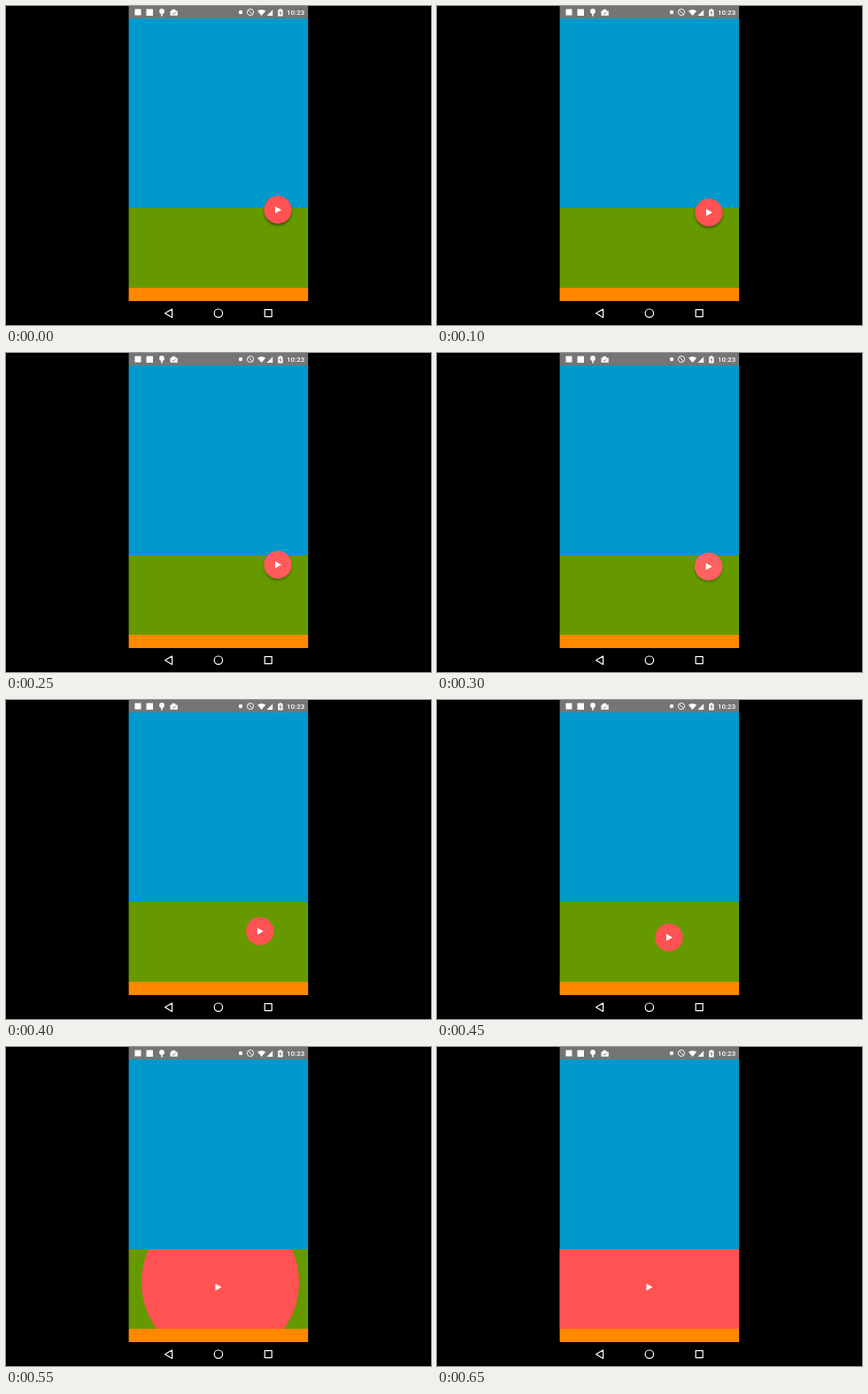
Animation of 480 by 360 pixels, one loop 700 ms. Source, as an HTML page:

```html
<!DOCTYPE html>
<html lang="en">
<head>
<meta charset="utf-8">
<title>Button reveal</title>
<style>
  html, body { margin: 0; width: 100%; height: 100%; overflow: hidden; background: #000; }
  svg { display: block; width: 480px; height: 360px; }
  text { font: 500 8px Roboto, sans-serif; }
</style>
</head>
<body>
<svg viewBox="0 0 480 360">
  <defs>
    <clipPath id="panel"><rect x="138.6" y="228" width="202.6" height="90"/></clipPath>
    <filter id="soft" x="-30%" y="-30%" width="160%" height="160%"><feGaussianBlur stdDeviation="1.7"/></filter>
  </defs>

  <rect width="480" height="360"/>
  <rect x="138.6" width="202.6" height="14" fill="#757575"/>
  <rect x="138.6" y="14" width="202.6" height="214" fill="#0099cc"/>
  <rect x="138.6" y="228" width="202.6" height="90" fill="#669900"/>
  <rect x="138.6" y="318" width="202.6" height="15" fill="#ff8800"/>

  <!-- status bar -->
  <g fill="#fff">
    <rect x="145.5" y="3.5" width="7" height="7"/>
    <rect x="158.5" y="3.5" width="7.5" height="7.5"/>
    <circle cx="176" cy="6" r="2.9"/>
    <path d="M175.2 8h1.6v3.4h-1.6z"/>
    <path d="M185.5 5.5h1.3l1-1.7h3l1 1.7h2v5.3h-8.3z"/>
    <circle cx="265" cy="7" r="2.2"/>
    <path d="M284 5.6q4.6-3.4 9.2 0l-4.6 5.4z"/>
    <path d="M294.6 11h6.6V4.2z"/>
    <path d="M307.2 4.2h1.5v-.9h2.4v.9h1.5v7.3h-5.4z"/>
    <text x="317" y="10">10:23</text>
  </g>
  <path d="M187.8 8l1.4 1.4 2.7-2.8M310.4 5.4l-1.4 2.3h1.8l-1.2 2.3" fill="none" stroke="#757575" stroke-width=".9"/>
  <path d="M273.4 4.4l5.2 5.2M272.4 7a3.6 3.6 0 1 0 7.2 0a3.6 3.6 0 1 0-7.2 0" fill="none" stroke="#fff" stroke-width=".9"/>

  <!-- navigation bar -->
  <g fill="none" stroke="#fff" stroke-width="1.2" stroke-linejoin="round">
    <path d="M179.6 346.8l8-4.7v9.4z"/>
    <circle cx="239.9" cy="346.7" r="4.7"/>
    <rect x="292.2" y="342.6" width="8" height="8"/>
  </g>

  <circle id="shadow" r="15.4" filter="url(#soft)"/>
  <circle id="disc"/>
  <path id="play" d="M-3-4L4 0L-3 4z" fill="#fff"/>
</svg>
<script>
const STEP = 50, LOOP = 700;
const $ = id => document.getElementById(id);
const shadow = $('shadow'), disc = $('disc'), play = $('play');

const set = (el, attrs) => {
  for (const k in attrs) el.setAttribute(k, attrs[k]);
};

// Linear lookup in a list of [time, value] pairs.
function track(points, t) {
  let i = 1;
  while (i < points.length - 1 && t > points[i][0]) i++;
  const [t0, a] = points[i - 1], [t1, b] = points[i];
  const k = Math.min(1, Math.max(0, (t - t0) / (t1 - t0)));
  return a + (b - a) * k;
}

const X = [[250, 307], [300, 306.7], [350, 301], [400, 286.8], [450, 262], [500, 239.5]];
const Y = [[0, 230], [100, 233], [200, 237], [300, 241], [350, 252], [400, 261], [450, 268], [500, 271]];
const RADIUS = [[450, 15.7], [500, 33], [550, 89], [600, 150]];
const LIFT = [[0, .5], [200, .36], [300, .28], [350, .1], [400, 0]];
const GLOW = [[100, 82], [200, 84], [300, 97], [350, 90], [400, 82]];

function draw(t) {
  const x = track(X, t), y = track(Y, t);
  const open = t >= 500;
  const glow = Math.round(track(GLOW, t));
  set(disc, {
    cx: open ? 242 : x,
    cy: open ? 265.5 : y,
    r: track(RADIUS, t),
    fill: `rgb(255,${glow},${glow})`,
    'clip-path': open ? 'url(#panel)' : 'none'
  });
  set(shadow, { cx: x, cy: y + 2, opacity: track(LIFT, t) });
  set(play, { transform: `translate(${x} ${y})` });
}

const start = performance.now();
function tick() {
  const t = (performance.now() - start) % LOOP;
  draw(Math.floor(t / STEP) * STEP);
  requestAnimationFrame(tick);
}
tick();
</script>
</body>
</html>
```
